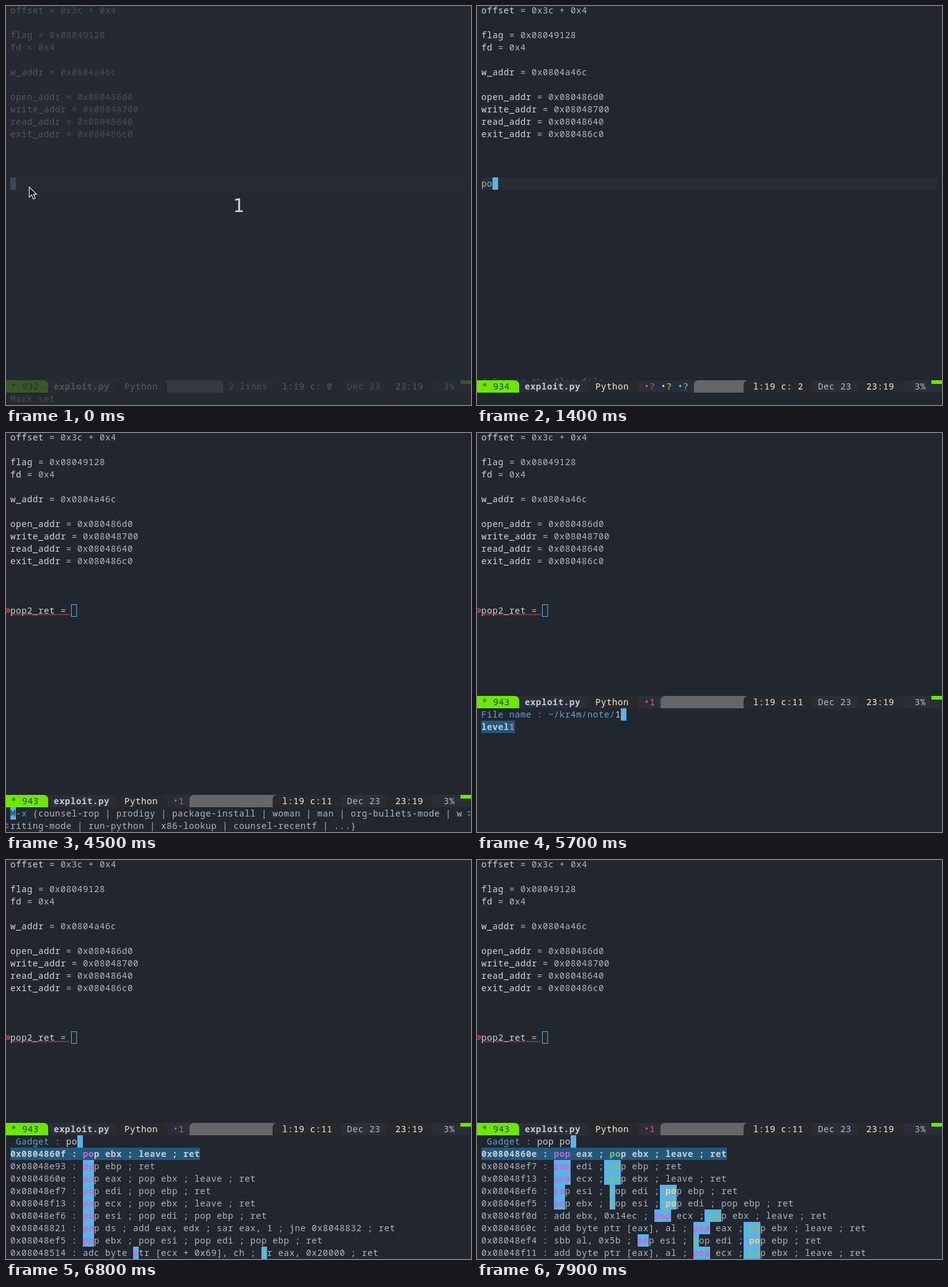
Animation, 750 px wide and 645 px high, one loop 8 s. Source, as an HTML page:

```html
<!DOCTYPE html>
<html lang="en">
<head>
<meta charset="utf-8">
<title>Editor gadget search</title>
<style>
html, body { margin: 0; width: 100%; height: 100%; overflow: hidden; background: #22262e; }
svg { display: block; width: 750px; height: 645px; }
text { white-space: pre; font: 14px "Noto Sans Mono", "DejaVu Sans Mono", monospace; letter-spacing: .6px; }
.b { font-weight: 700; }
.count { font: 30px "DejaVu Sans Mono", monospace; letter-spacing: 0; text-anchor: middle; }
</style>
</head>
<body>
<svg id="stage" viewBox="0 0 750 645"></svg>
<script>
const LOOP = 8000, CELL = 9, ROW = 20, LEFT = 7;
const C = {
  bg: '#22262e', line: '#292d35', name: '#d3d5d9', text: '#b1b5bd', comment: '#555a64',
  blue: '#5cb3e6', prompt: '#58a6d6', lime: '#6ce800', gray: '#666666', dark: '#292929',
  slate: '#2a2e38', white: '#eeeeea', soft: '#b4b9c4', pick: '#23587d', red: '#e8504f', pink: '#e8528f'
};
const MARKS = ['#c06ad8', '#7bc275', '#f5cf7c'];

const code = [
  'offset = 0x3c + 0x4', '', 'flag = 0x08049128', 'fd = 0x4', '', 'w_addr = 0x0804a46c', '',
  'open_addr = 0x080486d0', 'write_addr = 0x08048700', 'read_addr = 0x08048640', 'exit_addr = 0x080486c0'
];

// Each candidate: address, instructions, then column and length of its matches.
const first = [
  ['0x0804860f', 'pop ebx ; leave ; ret'],
  ['0x08048e93', 'pop ebp ; ret'],
  ['0x0804860e', 'pop eax ; pop ebx ; leave ; ret'],
  ['0x08048ef7', 'pop edi ; pop ebp ; ret'],
  ['0x08048f13', 'pop ecx ; pop ebx ; leave ; ret'],
  ['0x08048ef6', 'pop esi ; pop edi ; pop ebp ; ret'],
  ['0x08048821', 'pop ds ; add eax, edx ; sar eax, 1 ; jne 0x8048832 ; ret'],
  ['0x08048ef5', 'pop ebx ; pop esi ; pop edi ; pop ebp ; ret']
];
const loose = ['0x08048514', 'adc byte ptr [ecx + 0x69], ch ; or eax, 0x20000 ; ret'];
const pairs = [
  [...first[2], 13, 3, 22, 3],
  [...first[3], 13, 3, 22, 3],
  [...first[4], 13, 3, 22, 3],
  [...first[5], 13, 2, 23, 1, 32, 3],
  [...first[7], 13, 2, 23, 1, 32, 3],
  ['0x08048f0d', 'add ebx, 0x14ec ; pop ecx ; pop ebx ; leave ; ret', 31, 3, 40, 3],
  ['0x0804860c', 'add byte ptr [eax], al ; pop eax ; pop ebx ; leave ; ret', 38, 3, 47, 3],
  ['0x08048ef4', 'sbb al, 0x5b ; pop esi ; pop edi ; pop ebp ; ret', 28, 2, 38, 1, 47, 3],
  ['0x08048f11', 'add byte ptr [eax], al ; pop ecx ; pop ebx ; leave ; ret', 38, 3, 47, 3]
];
const lead = n => first.map(r => [...r, 13, n]);
const shorter = r => [...r.slice(0, -1), r.at(-1) - 1];
const lists = {
  all: [...first, loose],
  p: [...lead(1), [...loose, 22, 1]],
  po: [...lead(2), [...loose, 22, 1, 45, 1]],
  pop: [...lead(3), pairs[5].slice(0, 4)],
  'pop ': [...lead(4), [...pairs[5].slice(0, 3), 4]],
  'pop p': pairs.map(shorter),
  'pop po': pairs
};

// Changes add up from step to step.
const steps = [
  [0, { dim: .75, pointer: true, typed: '', echo: 'Mark set', region: true, check: '', mini: '' }],
  [400, { dim: .38 }],
  [500, { dim: 0 }],
  [700, { pointer: false, region: false }],
  [900, { typed: 'p', echo: '' }],
  [1000, { check: '???' }],
  [1400, { typed: 'po' }],
  [1500, { check: '' }],
  [1800, { typed: 'pop' }],
  [2000, { typed: 'pop2' }],
  [2200, { typed: 'pop2_' }],
  [2400, { typed: 'pop2_r' }],
  [2800, { typed: 'pop2_re' }],
  [3000, { typed: 'pop2_ret' }],
  [3200, { typed: 'pop2_ret ' }],
  [3500, { typed: 'pop2_ret =' }],
  [4000, { typed: 'pop2_ret = ' }],
  [4100, { check: '1' }],
  [4500, { mini: 'command', at: 0 }],
  [4600, { at: 4 }],
  [4700, { mini: 'file', input: '' }],
  [5700, { input: '1' }],
  [5800, { mini: '' }],
  [6000, { mini: 'gadget', input: '', list: 'all' }],
  [6200, { input: 'p' }],
  [6400, { list: 'p' }],
  [6600, { input: 'po' }],
  [6800, { list: 'po' }],
  [7000, { input: 'pop' }],
  [7200, { list: 'pop' }],
  [7400, { input: 'pop ', list: 'pop ' }],
  [7600, { input: 'pop p' }],
  [7700, { list: 'pop p' }],
  [7900, { input: 'pop po', list: 'pop po' }]
];
let sum = {};
const states = steps.map(([, change]) => sum = { ...sum, ...change });

const col = n => LEFT + n * CELL;
const rect = (x, y, w, h, fill) => `<rect x="${x}" y="${y}" width="${w}" height="${h}" fill="${fill}"/>`;
const path = (d, fill, rest = '') => `<path d="${d}" fill="${fill}" ${rest}/>`;
// y is the top of a text row.
const text = (x, y, s, fill, cls = '') => `<text x="${x}" y="${y + 15}" fill="${fill}" class="${cls}">${s}</text>`;
const span = (s, fill) => `<tspan fill="${fill}">${s}</tspan>`;
const block = (n, y) => rect(col(n), y, CELL, ROW, C.blue);

function codeLine(s, y) {
  const i = s.indexOf('=');
  return i < 0 ? text(LEFT, y, s, C.text) : text(LEFT, y, span(s.slice(0, i), C.name) + s.slice(i), C.text);
}

function editor(s) {
  const y = 277, n = s.typed.length, x = col(n);
  let out = code.map((l, i) => codeLine(l, i * ROW - 3)).join('');
  out += text(LEFT, 597, "# Open's the flag file", C.comment);
  if (!s.mini) out += rect(LEFT, y, 736, ROW, C.line) + block(n, y);
  out += codeLine(s.typed, y);
  if (s.mini) out += `<rect x="${x - .5}" y="277.5" width="8.5" height="19" fill="none" stroke="${C.blue}"/>`;
  if (s.check === '1') {
    const wave = 'M7 294.5' + 'l2 -2l2 2'.repeat(24);
    out += path(wave, 'none', `stroke="${C.red}"`);
    out += path('M.5 283.5l3 3.5l-3 3.5M3.5 283.5l3 3.5l-3 3.5', 'none', `stroke="${C.red}" stroke-width="1.3"`);
  }
  return out;
}

function modeLine(s, y) {
  const size = 932 + s.typed.length, c = String(s.typed.length).padStart(2);
  const tint = [C.pink, '#e6db74', '#66d0ef'];
  const gap = s.check ? 261 + 27 * s.check.length + (s.check === '1' ? 8 : 8) : 252;
  let out = rect(0, y, 750, 645 - y, C.bg) + rect(0, y, 750, ROW, C.slate);
  out += path(`M0 ${y}H60q8 0 8 8v12H0z`, C.lime);
  out += s.check
    ? path(`M${gap} ${y + 20}v-12q0 -8 8 -8H440v20z`, C.gray)
    : path(s.region ? `M252 ${y}H342q8 0 8 8v12H252z` : `M252 ${y}H440v20H252z`, C.gray);
  out += path(`M177 ${y}H252q8 0 8 8v12H177z`, C.dark);
  out += path(`M430 ${y + 20}v-12q0 -8 8 -8H540v20z`, C.dark);
  out += rect(613, y, 75, ROW, C.dark) + rect(733, y, 17, 6, C.lime);
  out += text(8, y, '* ' + size, '#2d3a24');
  out += text(77, y, 'exploit.py', '#c5cad4', 'b') + text(191, y, 'Python', C.white);
  [...s.check].forEach((ch, i) => out += text(269.5 + 27 * i, y, '•' + ch, tint[i]));
  if (s.region) out += text(359, y, '2 lines', C.soft);
  out += text(445.5, y, `l:19 c:${c}`, C.white) + text(550, y, 'Dec 23', C.soft);
  return out + text(628, y, '23:19', C.white) + text(706, y, '3%', C.soft);
}

function candidate(s, marks, y, picked) {
  let out = picked ? rect(LEFT, y, s.length * CELL, ROW, C.pick) : '', body = '', end = 0;
  for (let i = 0; i < marks.length; i += 2) {
    const [from, len] = [marks[i], marks[i + 1]];
    if (!len) continue;
    if (!picked) out += rect(col(from), y, len * CELL, ROW, C.blue);
    body += s.slice(end, from) + `<tspan class="b" fill="${MARKS[i / 2]}">${s.slice(from, from + len)}</tspan>`;
    end = from + len;
  }
  return out + text(LEFT, y, body + s.slice(end), picked ? '#c8cdd6' : C.text, picked ? 'b' : '');
}

function prompt(label, input, y) {
  return block(label.length + input.length, y) + text(LEFT, y, span(label, C.prompt) + input, C.name);
}

const wrapIcon = (x, y) => path(`M${x} ${y}h4v3h-4zM${x} ${y + 5}h4v3h-4z`, '#555960');

function minibuffer(s) {
  if (s.mini === 'command') {
    const m = s.at ? 'M' : span('M', C.bg);
    const brace = s.at ? span('{', C.bg) : '{';
    return block(s.at, 605)
      + text(LEFT, 605, span(m + '-x ', C.prompt) + brace
        + 'counsel-rop | prodigy | package-install | woman | man | org-bullets-mode | w', C.text)
      + text(LEFT, 625, 'riting-mode | run-python | x86-lookup | counsel-recentf | ...}', C.text)
      + wrapIcon(745, 611) + wrapIcon(0, 631);
  }
  if (s.mini === 'file')
    return prompt('File name : ~/kr4m/note/', s.input, 445) + candidate('level1', s.input ? [5, 1] : [], 465, true);
  if (s.mini === 'gadget')
    return prompt(' Gadget : ', s.input, 445) + lists[s.list].map(([addr, ops, ...marks], i) =>
      candidate(`${addr} : ${ops}`, marks, 465 + i * ROW, i === 0)).join('');
  return text(LEFT, 625, s.echo, C.text);
}

function draw(s) {
  const y = !s.mini ? 605 : s.mini === 'command' ? 585 : 425;
  let out = rect(0, 0, 750, 645, C.bg) + editor(s) + modeLine(s, y) + minibuffer(s);
  if (s.dim) {
    out += `<rect width="750" height="645" fill="#262a33" opacity="${s.dim}"/>`;
    out += `<text class="count" x="375" y="333" fill="#d6d8da" opacity="${s.dim / .75}">1</text>`;
  }
  if (s.pointer)
    out += path('M37.5 292.5v16.5l3.8 -3.6l2.8 6.6l3 -1.2l-2.8 -6.4h5z', '#15171b', 'stroke="#f2f2f2" stroke-width="1.1"');
  return out;
}

const stage = document.getElementById('stage');
const start = performance.now();
let shown = -1;
function tick() {
  const t = (performance.now() - start) % LOOP;
  const now = steps.findLastIndex(([at]) => at <= t);
  if (now !== shown) stage.innerHTML = draw(states[shown = now]);
  requestAnimationFrame(tick);
}
tick();
</script>
</body>
</html>
```
